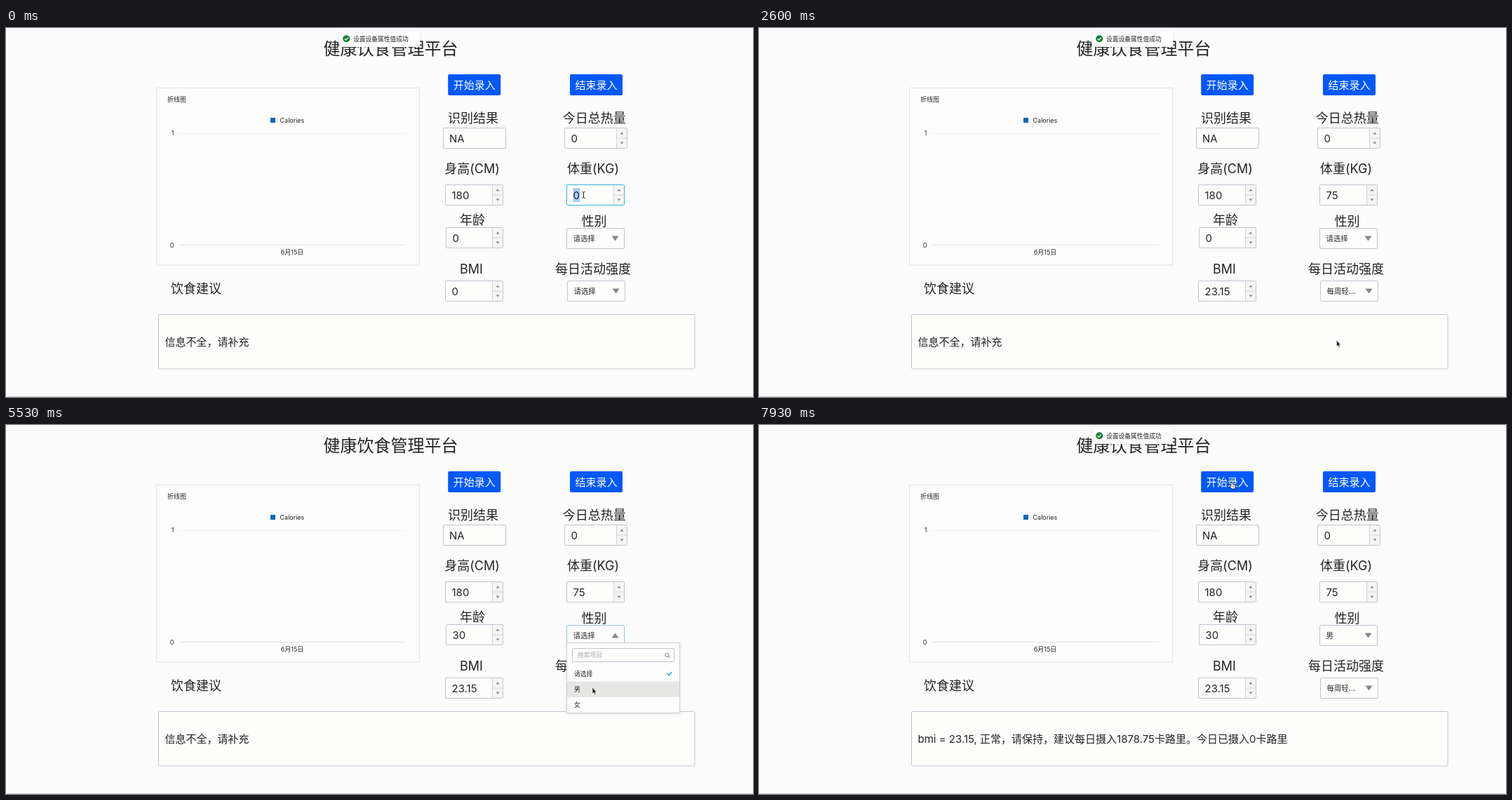
Write an HTML page that moves like this. It is 1065 by 526 pixels and loops after 8000 ms.

```html
<!DOCTYPE html>
<html lang="zh-CN">
<head>
<meta charset="utf-8">
<title>健康饮食管理平台</title>
<style>
html, body { margin: 0; width: 100%; height: 100%; overflow: hidden; background: #fcfcfd; }
svg { display: block; width: 1065px; height: 526px; }
text { font-family: Inter, "Noto Sans CJK SC", "Noto Sans CJK", sans-serif; fill: #242426; white-space: pre; }
</style>
</head>
<body>
<svg id="stage" viewBox="0 0 1065 526" xmlns="http://www.w3.org/2000/svg"></svg>
<script>
const stage = document.getElementById('stage');
const LOOP = 8000;
const BORDER = '#c3c3d0', FOCUS = '#35b5d8', FIELD = '#fdfdfc';

function add(tag, attrs, parent = stage) {
  const node = document.createElementNS('http://www.w3.org/2000/svg', tag);
  for (const key in attrs) node.setAttribute(key, attrs[key]);
  parent.appendChild(node);
  return node;
}
const group = (attrs = {}, parent) => add('g', attrs, parent);
const path = (d, attrs, parent) => add('path', { d, fill: 'none', ...attrs }, parent);
const rect = (x, y, width, height, attrs, parent) => add('rect', { x, y, width, height, ...attrs }, parent);

// y is the vertical middle of the glyphs
function label(content, x, y, size, attrs = {}, parent) {
  const node = add('text', { x, y: y + size * 0.37, 'font-size': size, ...attrs }, parent);
  node.textContent = content;
  return node;
}
const centered = (content, x, y, size, attrs) => label(content, x, y, size, { 'text-anchor': 'middle', ...attrs });

function frame(x, y, w, h, stroke = BORDER, parent) {
  return rect(x, y, w, h, { fill: FIELD, stroke, rx: 1.5 }, parent);
}

function triangle(cx, cy, w, h, up, parent) {
  const s = up ? -1 : 1;
  return path(`M${cx - w / 2} ${cy - s * h / 2}h${w}l${-w / 2} ${s * h}z`, { fill: '#85858a' }, parent);
}

function numberField(x, y, w, value) {
  const box = frame(x, y, w, 29);
  const left = x + w - 15, mid = y + 14.5;
  rect(left + .5, y + .5, 14, 28, { fill: '#f5f5f5' });
  path(`M${left} ${y + .5}v28M${left} ${mid}h14.5`, { stroke: '#d3d3d8' });
  triangle(left + 7.5, y + 7.5, 5, 3.2, true);
  triangle(left + 7.5, y + 21.5, 5, 3.2, false);
  const text = label(value, x + 9, y + 14.7, 15);
  return { box, text };
}

function selectField(x, y) {
  const box = frame(x, y, 82, 29);
  const text = label('请选择', x + 9, y + 14.7, 10.4, { 'font-weight': 500 });
  const down = triangle(x + 69, y + 14.5, 10, 7, false);
  const up = triangle(x + 69, y + 14.5, 10, 7, true);
  return { box, text, down, up };
}

function dropdown(x, y, items, height) {
  const root = group();
  rect(x, y, 161, height, { fill: '#fdfdfd', stroke: '#cfcfd2', filter: 'url(#soft)' }, root);
  frame(x + 8, y + 8, 145, 19, BORDER, root);
  label('搜索项目', x + 15.5, y + 17.5, 8.75, { fill: '#a9a9ad' }, root).style.fill = '#a9a9ad';
  add('circle', { cx: x + 143, cy: y + 17.5, r: 2.6, fill: 'none', stroke: '#77777c' }, root);
  path(`M${x + 145} ${y + 19.5}l2.3 2.3`, { stroke: '#77777c' }, root);
  const rowTop = i => y + 32.8 + i * 22.35;
  const hover = rect(x + .5, 0, 160, 22.3, { fill: '#e6e6e4' }, root);
  items.forEach((item, i) => label(item, x + 10.5, rowTop(i) + 11, 8.75, {}, root));
  path(`M${x + 143} ${y + 43.8}l2.4 2.5 4.4-4.8`, { stroke: '#18a9de', 'stroke-width': 1.5 }, root);
  return {
    update(open, cursorX, cursorY) {
      show(root, open);
      const row = Math.floor((cursorY - rowTop(0)) / 22.35);
      const inside = row >= 0 && row < items.length && cursorX > x && cursorX < x + 161;
      show(hover, inside);
      if (inside) hover.setAttribute('y', rowTop(row));
    }
  };
}

function show(node, visible) {
  node.setAttribute('visibility', visible ? 'inherit' : 'hidden');
}

const defs = add('defs', {});
const soft = add('filter', { id: 'soft', x: '-20%', y: '-50%', width: '140%', height: '200%' }, defs);
add('feDropShadow', { dx: 0, dy: 1, stdDeviation: 2, 'flood-color': '#000', 'flood-opacity': .1 }, soft);

rect(0, 0, 1065, 526, { fill: '#fcfcfd' });
centered('健康饮食管理平台', 548.5, 29, 24);

// Chart
rect(214.5, 85.5, 375, 252.5, { fill: '#fdfdfd', stroke: '#e4e4e2' });
label('折线图', 230, 101.3, 9);
rect(377, 128, 7, 7, { fill: '#0868bd' });
label('Calories', 390.5, 131.3, 9);
path('M247 150.5H570', { stroke: '#e9e9e9', 'stroke-dasharray': '4 2' });
path('M247 309.5H570', { stroke: '#e2e2e0' });
label('1', 239.5, 150, 9, { 'text-anchor': 'end' });
label('0', 239.5, 309.5, 9, { 'text-anchor': 'end' });
centered('6月15日', 408, 320, 9);

// Form
for (const [name, x] of [['开始录入', 667.7], ['结束录入', 841.5]]) {
  rect(x - 37.5, 66, 75, 30, { fill: '#0358fb', rx: 2 });
  centered(name, x, 81, 15).style.fill = '#fff';
}
[['识别结果', 666, 128.5], ['今日总热量', 838.7, 128.5], ['身高(CM)', 664.5, 200.5], ['体重(KG)', 837, 200.5],
 ['年龄', 665, 273.5], ['性别', 838.5, 275], ['BMI', 663.5, 343.5], ['每日活动强度', 837, 343]]
  .forEach(([name, x, y]) => centered(name, x, y, 18));

frame(623.5, 142.5, 89, 29);
label('NA', 632, 157.2, 15);
numberField(796.5, 142.5, 89, '0');
numberField(626.5, 223.5, 82, '180');
const weight = numberField(799.5, 223.5, 82, '0');
const age = numberField(627.5, 284.5, 81, '0');
const bmi = numberField(626.5, 360.5, 82, '0');
const gender = selectField(799.5, 285.5);
const activity = selectField(800.5, 360.5);

function selection(field, x, y) {
  const mark = rect(x, y, 10, 20, { fill: '#abcbf5' });
  stage.insertBefore(mark, field.text);
  return mark;
}
const weightMark = selection(weight, 808.5, 228);
const ageMark = selection(age, 636.5, 289);

label('饮食建议', 235, 371, 18);
frame(217.5, 408.5, 764.5, 77.5);
const advice = label('', 226.5, 447.3, 15);

path('M0 525.5H1065', { stroke: '#cacace' });

const activityList = dropdown(800.5, 385.5,
  ['请选择', '常坐办公室，几乎不动', '每周轻松运动3-5日', '每周中等强度运动3-5日', '每周高强度运动6-7日'], 160);
const genderList = dropdown(799.5, 310.5, ['请选择', '男', '女'], 100);

const scrollbar = group();
rect(1056, 0, 9, 526, { fill: '#f8f8f9' }, scrollbar);
path('M1055.5 0V526', { stroke: '#e9e9eb' }, scrollbar);
rect(1058, 36, 5, 450, { rx: 2.5, fill: '#bfbfc1' }, scrollbar);

const toast = group();
rect(475, 4, 115, 23, { rx: 2, fill: '#fefefe', filter: 'url(#soft)' }, toast);
add('circle', { cx: 485.3, cy: 15.3, r: 5, fill: '#178038' }, toast);
path('M482.8 15.4l1.8 1.8 3.2-3.5', { stroke: '#fff', 'stroke-width': 1.2 }, toast);
label('设置设备属性值成功', 495, 15.4, 8.75, {}, toast);

// Pointers, each drawn around its hot spot
const pointer = group();
const pointers = { beam: group({}, pointer), hand: group({}, pointer), arrow: group({}, pointer) };
const beamShape = 'M-2-4.5Q0-4.5 0-3.3Q0-4.5 2-4.5M0-3.5V3.5M-2 4.5Q0 4.5 0 3.3Q0 4.5 2 4.5';
path(beamShape, { stroke: '#fff', 'stroke-width': 2.2 }, pointers.beam);
path(beamShape, { stroke: '#222', 'stroke-width': 1 }, pointers.beam);
path('M-2-4Q-1-5 0-4L1-1 3-1Q5-.5 4.7 2L3.5 5H-1L-4 1.2Q-4-.3-2 .7Z',
  { fill: '#fff', stroke: '#222', 'stroke-width': 1, 'stroke-linejoin': 'round' }, pointers.hand);
path('M.8 0V3M2.6 .2V3', { stroke: '#222', 'stroke-width': .6 }, pointers.hand);
path('M0-1V8L2 6.3 3.5 9.5 5 8.8 3.6 5.8H6Z',
  { fill: '#111', stroke: '#fff', 'stroke-width': .7 }, pointers.arrow);

// time, x, y
const route = [
  [0, 823.5, 238], [1200, 823.5, 238], [1600, 866, 376], [1800, 866, 378], [2000, 867.5, 404.5],
  [2200, 852, 474], [2450, 852, 474], [3050, 671, 296], [3800, 671, 296], [4200, 679.5, 313],
  [4400, 679.5, 313], [4900, 862, 301], [5100, 862, 301], [5400, 836, 375], [5900, 836, 375],
  [6500, 675, 86], [LOOP, 675, 86]
];
// time, pointer kind
const kinds = [[0, 'beam'], [1350, 'arrow'], [1550, 'hand'], [2100, 'arrow'], [2950, 'beam'],
  [4450, 'arrow'], [4780, 'hand'], [5200, 'arrow'], [6430, 'hand']];
const toasts = [[-500, 270], [950, 1900], [2250, 3200], [3950, 4950], [5900, 6850], [6900, 8500]];

const at = (steps, t) => steps.filter(step => step[0] <= t).pop()[1];
const within = (t, from, to) => t >= from && t < to;
const clamp = v => Math.max(0, Math.min(1, v));

function position(t) {
  const i = route.findIndex(stop => stop[0] > t);
  const [t0, x0, y0] = route[i - 1], [t1, x1, y1] = route[i];
  const u = (t - t0) / (t1 - t0), e = u * u * (3 - 2 * u);
  return [x0 + (x1 - x0) * e, y0 + (y1 - y0) * e];
}

function setSelect(field, value, open) {
  field.text.textContent = value;
  show(field.up, open);
  show(field.down, !open);
}

function render(t) {
  const [x, y] = position(t);
  const activityOpen = within(t, 1700, 2300);
  const genderOpen = within(t, 5000, 5850);

  weight.text.textContent = at([[0, '0'], [700, '7'], [850, '75']], t);
  bmi.text.textContent = t < 1150 ? '0' : '23.15';
  age.text.textContent = at([[0, '0'], [3700, '3'], [3850, '30']], t);
  show(weightMark, t < 700);
  show(ageMark, within(t, 3450, 3700));
  weight.box.setAttribute('stroke', t < 1700 ? FOCUS : BORDER);
  age.box.setAttribute('stroke', within(t, 3150, 5000) ? FOCUS : BORDER);
  activity.box.setAttribute('stroke', activityOpen ? FOCUS : BORDER);
  gender.box.setAttribute('stroke', genderOpen ? '#9fc3d8' : BORDER);
  setSelect(activity, t < 2250 ? '请选择' : '每周轻...', activityOpen);
  setSelect(gender, t < 5850 ? '请选择' : '男', genderOpen);
  activityList.update(activityOpen, x, y);
  genderList.update(genderOpen, x, y);
  show(scrollbar, activityOpen);
  advice.textContent = t < 6200 ? '信息不全，请补充'
    : 'bmi = 23.15, 正常，请保持，建议每日摄入1878.75卡路里。今日已摄入0卡路里';

  const opacity = Math.max(...toasts.map(([from, to]) => clamp(Math.min(t - from, to - t) / 90)));
  toast.setAttribute('opacity', opacity);
  toast.setAttribute('transform', `translate(0 ${(opacity - 1) * 8})`);

  const kind = at(kinds, t);
  for (const name in pointers) show(pointers[name], name === kind);
  pointer.setAttribute('transform', `translate(${x} ${y})`);
}

const start = performance.now();
function tick() {
  render((performance.now() - start) % LOOP);
  requestAnimationFrame(tick);
}
tick();
</script>
</body>
</html>
```
